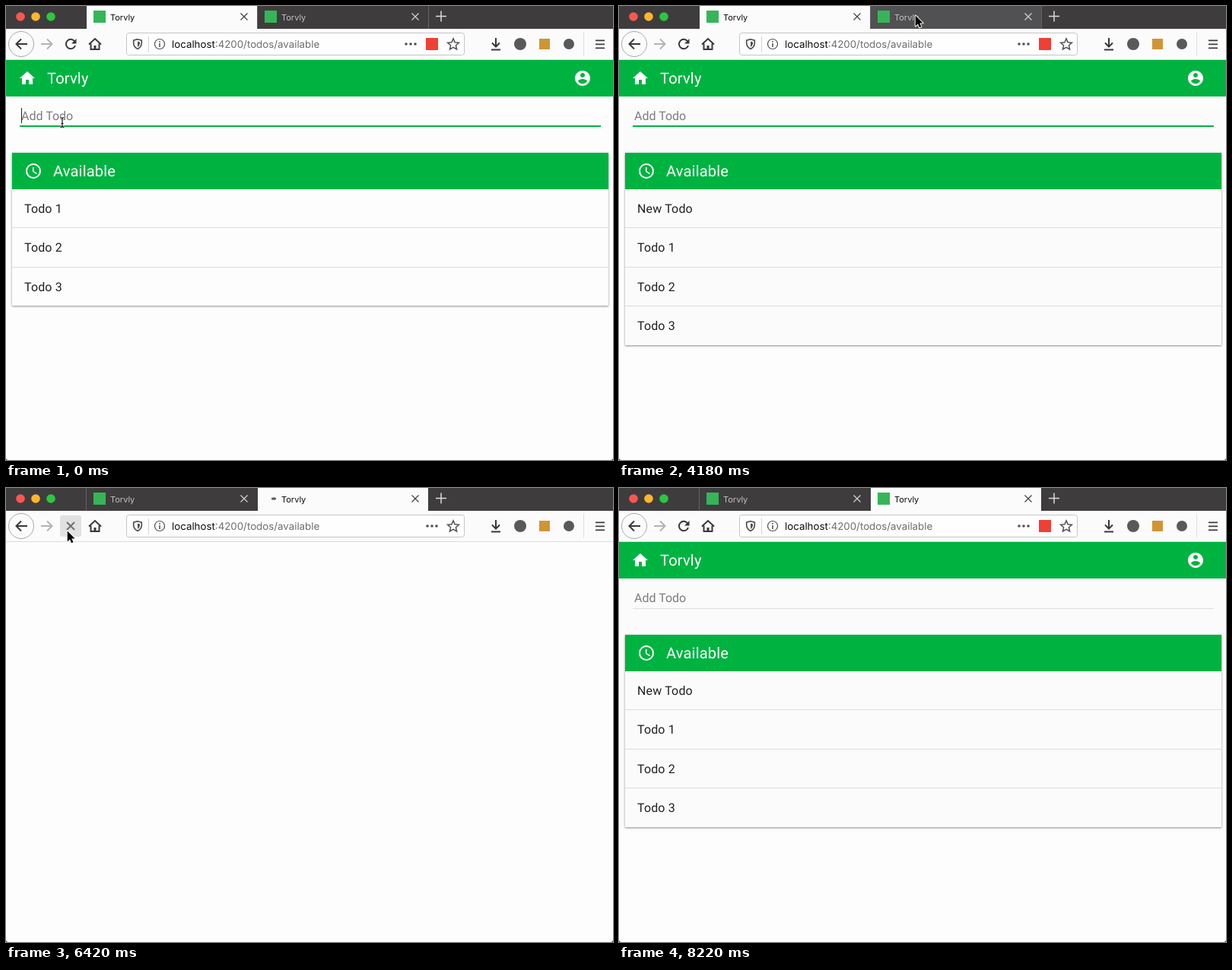
These frames come from a looping animation (798x597 px, 8320 ms). An HTML page with a canvas:

```html
<!DOCTYPE html>
<html lang="en">
<head>
<meta charset="utf-8">
<title>Todo list</title>
<style>
html, body { margin: 0; width: 100%; height: 100%; overflow: hidden; background: #fdfdfd; }
canvas { display: block; }
</style>
</head>
<body>
<canvas id="stage" width="798" height="597"></canvas>
<script>
const ctx = document.getElementById('stage').getContext('2d');
const LOOP = 8320, STEP = 150, PITCH = 51.3;
const GREEN = '#00b341', DARK = '#3f3c3e', INK = '#38383b';
const UI = 'Inter, "Open Sans", sans-serif', APP = 'Roboto, Arial, sans-serif';
const NAME = 'Torvly';

const ICONS = {
  home: new Path2D('M10 20v-6h4v6h5v-8h3L12 3 2 12h3v8z'),
  user: new Path2D('M12 2C6.48 2 2 6.48 2 12s4.48 10 10 10 10-4.48 10-10S17.52 2 12 2zm0 3c1.66 0 3 1.34 3 3s-1.34 3-3 3-3-1.34-3-3 1.34-3 3-3zm0 14.2c-2.5 0-4.71-1.28-6-3.22.03-1.99 4-3.08 6-3.08 1.99 0 5.97 1.09 6 3.08-1.29 1.94-3.5 3.22-6 3.22z'),
  clock: new Path2D('M12 2a10 10 0 1 0 0 20a10 10 0 1 0 0-20zM12 20a8 8 0 1 1 0-16a8 8 0 1 1 0 16zm.5-13H11v6l5.25 3.15.75-1.23-4.5-2.67z'),
  arrow: new Path2D('M0 0V16L3.8 12.5L6.2 18L9 16.8L6.6 11.4H11.5z')
};

function rect(x, y, w, h, color) {
  ctx.fillStyle = color;
  ctx.fillRect(x, y, w, h);
}

function text(str, x, y, size, color, family = APP, spacing = 0) {
  ctx.font = `${size}px ${family}`;
  ctx.textRendering = 'geometricPrecision';
  ctx.letterSpacing = `${spacing}px`;
  ctx.fillStyle = color;
  ctx.fillText(str, x, y);
}

function dot(x, y, r, color) {
  ctx.beginPath();
  ctx.arc(x, y, r, 0, Math.PI * 2);
  ctx.fillStyle = color;
  ctx.fill();
}

function box(x, y, w, h, r, fill, border) {
  ctx.beginPath();
  ctx.roundRect(x, y, w, h, r);
  if (fill) { ctx.fillStyle = fill; ctx.fill(); }
  if (border) { ctx.strokeStyle = border; ctx.lineWidth = 1; ctx.stroke(); }
}

function stroke(d, color, width = 2) {
  ctx.strokeStyle = color;
  ctx.lineWidth = width;
  ctx.stroke(new Path2D(d));
}

function icon(path, x, y, color) {
  ctx.save();
  ctx.translate(x, y);
  ctx.fillStyle = color;
  ctx.fill(path);
  ctx.restore();
}

const cross = (x, y, r, color, w) =>
  stroke(`M${x - r} ${y - r}l${2 * r} ${2 * r}M${x + r} ${y - r}l${-2 * r} ${2 * r}`, color, w);

// Progress of a move that advances in n equal jumps.
function jumps(t, start, n, gap = STEP) {
  return Math.max(0, Math.min(1, (Math.floor((t - start) / gap) + 1) / n));
}
const smooth = u => u * u * (3 - 2 * u);
const bez = (a, b, c, u) => a * (1 - u) ** 2 + 2 * b * u * (1 - u) + c * u * u;

function pointer(t) {
  if (t < 3600) return { x: 74, y: 153, beam: true };
  if (t < 5080) {
    const u = smooth(jumps(t, 3600, 5, 145));
    return { x: bez(74, 240, 389, u), y: bez(153, 60, 12, u) };
  }
  if (t < 7320) {
    const u = smooth(jumps(t, 5080, 4));
    return { x: bez(389, 190, 80, u), y: bez(12, 148, 56, u) };
  }
  if (t < 7920) {
    const u = jumps(t, 7320, 4);
    return { x: 80 + 691 * u, y: 56 + 476 * u };
  }
  return t < 8070 ? { x: 778, y: 586 } : null;
}

function typed(t) {
  if (t < 600 || t >= 2850) return '';
  const n = Math.min(7, Math.floor((t - 600) / STEP) + 1);
  return 'New Todo'.slice(0, n > 5 ? n + 1 : n);
}

function caretOn(t) {
  if (t < 1650) return true;
  return t < 4050 && Math.floor((t - 1650) / 600) % 2 === 1;
}

// A row stays shaded for one step after the pointer has left it.
function hovered(t, row) {
  return [t, t - STEP].some(time => {
    const m = pointer(time);
    return m && m.y > 241 && Math.floor((m.y - 241) / PITCH) === row;
  });
}

function tab(x, active, hover, loading, t) {
  if (active) rect(x, 0, 224, 30, '#fbfbfc');
  else if (hover) rect(x, 0, 224, 30, '#515052');
  if (loading) {
    const shift = Math.floor((t - 5980) / STEP) - 1;
    ctx.beginPath();
    ctx.ellipse(x + 19 + shift * 2, 14, 3.2, 1.8, 0, 0, 7);
    ctx.fillStyle = '#626265';
    ctx.fill();
  } else {
    rect(x + 9, 6, 16, 16, '#35b558');
  }
  text(NAME, x + 31, 18.5, 11, active ? '#0c0c0d' : '#c3c2c3', UI);
  cross(x + 207, 14, 4.5, active ? '#454548' : '#cfcecf', 1.3);
}

function tabBar(t, second, mouse, loading) {
  rect(0, 0, 798, 30, DARK);
  dot(19, 14, 5.8, '#fc5650');
  dot(39, 14, 5.8, '#fdb72d');
  dot(59, 14, 5.8, '#2bc840');
  const hover = mouse && mouse.y < 30 && mouse.x > 331;
  tab(106, !second, false, false, t);
  tab(331, second, hover, loading, t);
  rect(second ? 105 : 330, 0, 1, 30, '#656365');
  if (!second) rect(555, 0, 1, 30, '#656365');
  stroke('M565 13.5h14M572 6.5v14', '#dddcdd', 1.5);
}

function reload(t, over) {
  const busy = t >= 5980 && t < 6570;
  const off = t >= 6570 && t < 7020;
  if (over && !off) box(71, 36, 28, 28, 2, t >= 5980 && t < 6130 ? '#cdcdce' : '#e1e1e2');
  if (busy && t >= 6280) return cross(85, 50, 5, '#707074', 2);
  if (busy && t >= 6130) return stroke('M79 44l6 5.5', '#8a8a8d', 2);
  const color = off ? '#b4b4b6' : INK;
  stroke('M90.2 46.5A6.2 6.2 0 1 0 91 52', color);
  ctx.fillStyle = color;
  ctx.fill(new Path2D('M92.5 43v6.5h-6.5z'));
}

function toolbar(t, mouse, loading) {
  rect(0, 30, 798, 41, '#fbfbfc');
  rect(0, 70, 798, 1, '#dcdcdd');
  ctx.beginPath();
  ctx.arc(20, 50, 16.5, 0, Math.PI * 2);
  ctx.strokeStyle = '#a9a9ab';
  ctx.lineWidth = 1;
  ctx.stroke();
  stroke('M28 50H14M20 43.5L13.5 50L20 56.5', INK);
  stroke('M46 50H60M54 43.5L60.5 50L54 56.5', '#b3b3b5');
  reload(t, mouse && mouse.x >= 71 && mouse.x < 99 && mouse.y > 36 && mouse.y < 64);
  stroke('M109 50.5L117 43l8 7.5M111.5 49.5V57h11V49.5', INK);
  rect(115.5, 52, 3, 5, INK);

  const overUrl = mouse && mouse.x > 158 && mouse.x < 603 && mouse.y > 35 && mouse.y < 65;
  box(158.5, 35.5, 444, 29, 3, '#fefefe', overUrl ? '#9c9c9e' : '#c5c5c7');
  stroke('M173 43.7l5.3 1.5v3.8q-.4 5.2-5.3 7.5q-4.9-2.3-5.3-7.5v-3.8z', '#515154', 1.7);
  ctx.fillStyle = '#515154';
  ctx.fill(new Path2D('M173 46.5l3 .9v2q-.3 3-3 4.6z'));
  rect(187, 40, 1, 21, '#d2d2d4');
  stroke('M202 43.5a6.5 6.5 0 1 0 .01 0', '#58585b', 1.2);
  rect(201.2, 49, 1.6, 5, '#58585b');
  rect(201.2, 46, 1.6, 1.7, '#58585b');
  text('localhost', 218, 55, 13.3, '#0c0c0d', UI);
  text(':4200/todos/available', 218 + ctx.measureText('localhost').width, 55, 13.3, '#6d6d71', UI);
  const more = loading ? 560 : 532;
  for (let i = -1; i <= 1; i++) dot(more + i * 6, 50, 1.8, '#515154');
  if (!loading) rect(552, 42, 16, 16, '#ee4035');

  ctx.beginPath();
  for (let i = 0; i < 10; i++) {
    const a = i * Math.PI / 5 - Math.PI / 2, r = i % 2 ? 3.6 : 7.8;
    ctx.lineTo(588 + r * Math.cos(a), 50.7 + r * Math.sin(a));
  }
  ctx.closePath();
  ctx.strokeStyle = '#515154';
  ctx.lineWidth = 1.5;
  ctx.stroke();

  stroke('M644 42v11M639 48.5l5 5l5-5M638 57.5h12', INK);
  dot(676, 50, 8, '#59595c');
  rect(701, 43, 14, 14, '#cf9534');
  dot(740, 50, 7, '#59595c');
  rect(759, 34, 1, 32, '#dededf');
  for (let i = 0; i < 3; i++) rect(775, 44.5 + i * 5, 12, 1.7, INK);
}

function card(t, rows) {
  const height = 48 + Math.floor(PITCH * rows.length);
  const fill = rows.length > 3 ? '#fbfbfb' : '#fdfdfd';
  ctx.save();
  ctx.shadowColor = 'rgba(0,0,0,.45)';
  ctx.shadowBlur = 2.5;
  ctx.shadowOffsetY = 1;
  rect(8, 193, 784, height, fill);
  ctx.restore();
  rect(8, 193, 784, 48, GREEN);
  icon(ICONS.clock, 24, 205, '#fff');
  text('Available', 62, 224, 20, '#fff', APP, 0.2);
  rows.forEach((label, i) => {
    const top = Math.round(241 + i * PITCH);
    if (i) rect(8, top - 1, 784, 1, '#dcdcdc');
    text(label, 24, Math.round(272 + i * PITCH), 16, '#212121', APP, 0.15);
    if (hovered(t, i)) rect(8, top, 784, Math.floor(PITCH), 'rgba(0,0,0,.13)');
  });
}

function page(t, second) {
  rect(0, 71, 798, 526, '#fdfdfd');
  if (t >= 6280 && t < 6570) return;
  const added = second ? t >= 6570 : t >= 2850;
  if (added) rect(second ? 0 : 7, second ? 119 : 134, second ? 798 : 786, second ? 329 : 314, '#fbfbfb');
  rect(0, 71, 798, 48, GREEN);
  icon(ICONS.home, 16, 83, '#fff');
  text(NAME, 54, 102, 20, '#fff', APP, 0.2);
  icon(ICONS.user, 746, 83, '#fff');

  const value = second ? '' : typed(t);
  text(value || 'Add Todo', 20, 150, 16, value ? '#212121' : '#7d7d7d');
  if (second) {
    rect(18, 158, 764, 1, '#dfdfdf');
  } else {
    rect(18, 157, 764, 2, GREEN);
    if (caretOn(t)) {
      const x = value ? 20 + Math.round(ctx.measureText(value).width) : 20;
      rect(Math.min(92, x), 134, 1, 20, '#212121');
    }
  }
  const rows = ['Todo 1', 'Todo 2', 'Todo 3'];
  card(t, added ? ['New Todo', ...rows] : rows);
}

function statusBar() {
  box(-2.5, 578.5, 255, 22, 2, '#fafafa', '#cbcbcc');
  text('Read localhost', 4, 592.5, 11, '#38383b', UI);
}

function drawPointer(m) {
  if (m.beam) {
    const d = 'M71.5 146.5q2.5 0 2.5 2v9q0 2-2.5 2M76.5 146.5q-2.5 0-2.5 2M74 157.5q0 2 2.5 2M72.5 154.5h3';
    stroke(d, 'rgba(255,255,255,.8)', 3);
    stroke(d, '#111', 1.2);
    return;
  }
  ctx.save();
  ctx.translate(m.x + 0.7, m.y + 0.5);
  ctx.scale(0.86, 0.88);
  ctx.lineJoin = 'round';
  ctx.strokeStyle = '#fff';
  ctx.lineWidth = 2.2;
  ctx.stroke(ICONS.arrow);
  ctx.fillStyle = '#000';
  ctx.fill(ICONS.arrow);
  ctx.restore();
}

function draw(t) {
  const second = t >= 4330;
  const loading = t >= 5980 && t < 6570;
  const mouse = pointer(t);
  page(t, second);
  tabBar(t, second, mouse, loading);
  toolbar(t, mouse, loading);
  if (t >= 6130 && t < 6280) statusBar();
  ctx.fillStyle = '#2c2c2c';
  ctx.fill(new Path2D('M0 594v3h3q-3 0-3-3zM798 594v3h-3q3 0 3-3z'));
  if (mouse) drawPointer(mouse);
}

const begin = performance.now();
function frame() {
  draw((performance.now() - begin) % LOOP);
  requestAnimationFrame(frame);
}
frame();
</script>
</body>
</html>
```
